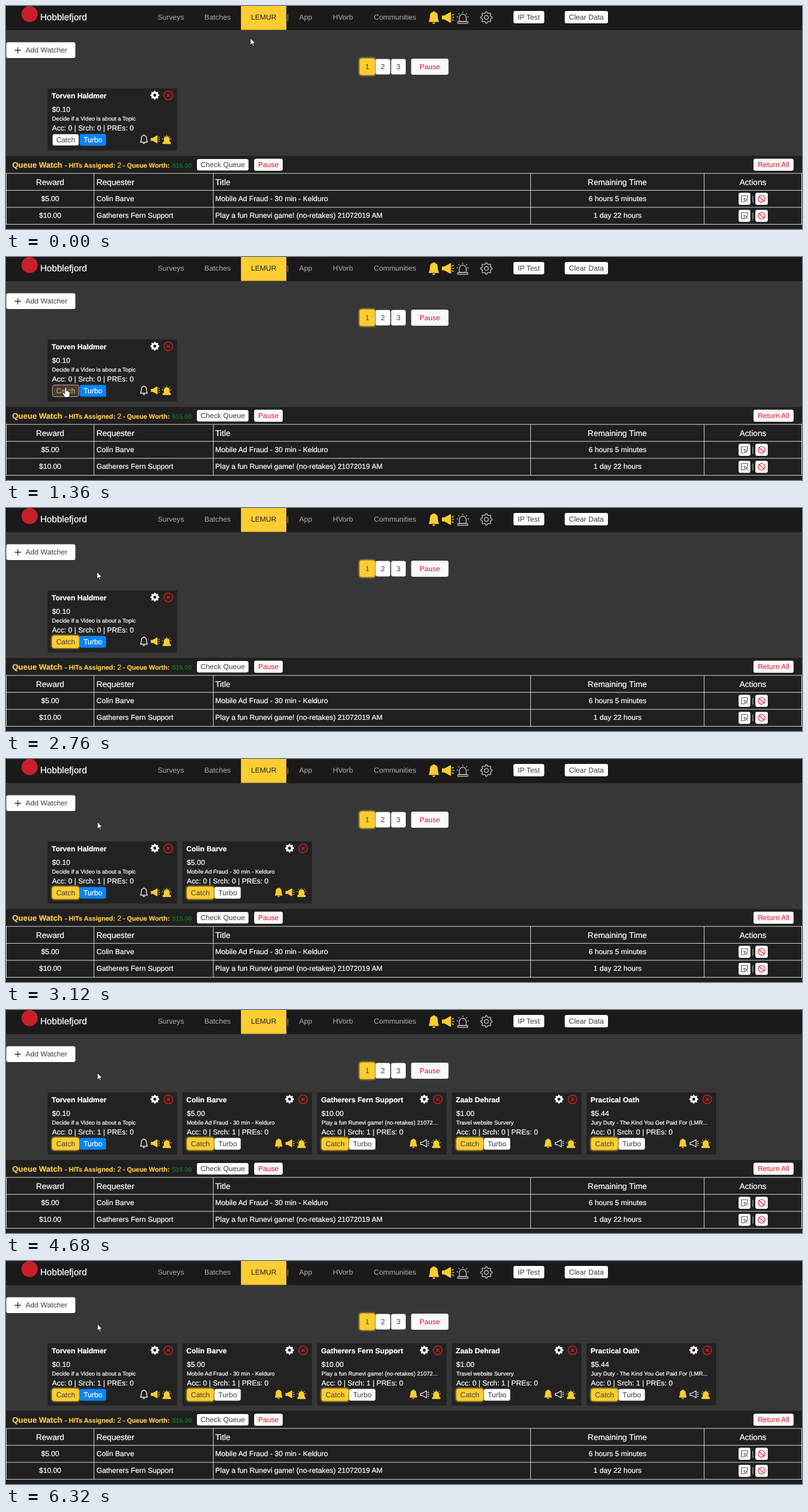
Animation of 1280x360 px, one loop 6360 ms. Source, as an HTML page:

```html
<!DOCTYPE html>
<html lang="en">
<head>
<meta charset="utf-8">
<title>Watcher dashboard</title>
<style>
  html, body { margin: 0; width: 100%; height: 100%; overflow: hidden; background: #373737; }
  svg { display: block; width: 1280px; height: 360px; }
  text { font-family: "Liberation Sans", Arial, sans-serif; font-size: 11.7px; white-space: pre; text-rendering: geometricPrecision; }
</style>
</head>
<body>
<svg id="stage" viewBox="0 0 1280 360" xmlns="http://www.w3.org/2000/svg"></svg>
<script>
const LOOP = 6360;
const YELLOW = "#fecd32", GOLD = "#fdc849", WHITE = "#fff", DARK = "#222", INK = "#3c3f43", RED = "#e01b24", GREY = "#adadad";

// Drawing helpers; light text on dark gets a hairline stroke to look as full as on screen
const rect = (x, y, w, h, fill, extra = "") =>
  `<rect x="${x}" y="${y}" width="${w}" height="${h}" fill="${fill}" ${extra}/>`;
const text = (x, y, s, fill = WHITE, { size = 11.7, anchor = "start", bold = false, id = "" } = {}) =>
  `<text x="${x}" y="${y}" fill="${fill}" text-anchor="${anchor}" style="font-size:${size}px"` +
  `${[WHITE, GOLD].includes(fill) ? ` stroke="${fill}" stroke-width=".22"` : ""}` +
  `${bold ? ' font-weight="700"' : ""}${id ? ` id="${id}"` : ""}>${s}</text>`;
const mid = (x, y, s, fill, opts) => text(x, y, s, fill, { ...opts, anchor: "middle" });
const button = (x, y, w, h, label, { bg = WHITE, fg = INK, glow = false, id = "" } = {}) =>
  `<g ${id ? `id="${id}"` : ""}>` +
  (glow ? rect(x - 1, y - 1, w + 2, h + 2, YELLOW, 'class="glow" rx="4" filter="url(#glow)"') : "") +
  rect(x, y, w, h, bg, 'class="face" rx="3"') +
  mid(x + w / 2, y + h / 2 + 4.1, label, fg) + "</g>";
const at = (x, y, scale, body) => `<g transform="translate(${x} ${y}) scale(${scale})">${body}</g>`;
const path = (d, attrs) => `<path d="${d}" ${attrs}/>`;
const paint = (color, solid) =>
  `fill="${solid ? color : "none"}" stroke="${color}" stroke-width="1.2" stroke-linejoin="round"`;

// Icons, centred on the origin
const bell = (color, solid) =>
  path("M-5.5 4.8C-4.2 3-4.2-.5-4-2.5A4 4 0 0 1-.9-6 .9 .9 0 1 1 .9-6 4 4 0 0 1 4-2.5C4.2-.5 4.2 3 5.5 4.8Z", paint(color, solid)) +
  path("M-1.8 6.2a1.8 1.6 0 0 0 3.6 0Z", `fill="${color}"`);
const horn = (color, solid) =>
  path("M-7-2H-4L3.5-6.2V6.2L-4 2H-7Z", paint(color, solid)) +
  path("M5.5-3 7.5-4M5.8 0H8M5.5 3 7.5 4", `fill="none" stroke="${color}" stroke-width="1.3"`);
const siren = (color, solid) =>
  path("M-4.4 4.6V-.4a4.4 4.4 0 0 1 8.8 0V4.6Z", paint(color, solid)) +
  path("M-6.4 4.8H6.4V7H-6.4Z", paint(color, solid)) +
  path("M0-8V-6.4M-5.4-6-4.4-4.9M5.4-6 4.4-4.9M-7.8-1.5H-6.1M7.8-1.5H6.1", `fill="none" stroke="${color}" stroke-width="1.2"`);
const gearPath = (outer, inner) => {
  const points = [];
  for (let i = 0; i < 32; i++) {
    const r = i % 4 < 2 ? outer : inner, a = (i - 0.5) * Math.PI / 16;
    points.push(`${(r * Math.cos(a)).toFixed(2)} ${(r * Math.sin(a)).toFixed(2)}`);
  }
  return `M${points.join("L")}Z`;
};
const smallGear = path(gearPath(7.2, 5.6) + "M2.4 0A2.4 2.4 0 1 0-2.4 0 2.4 2.4 0 1 0 2.4 0Z", 'fill="#fff" fill-rule="evenodd"');
const bigGear = path(gearPath(9.2, 7.2), `fill="none" stroke="${GREY}" stroke-width="1.5" stroke-linejoin="round"`) +
  `<circle r="3.2" fill="none" stroke="${GREY}" stroke-width="1.5"/>`;
const closeIcon = path("M7 0A7 7 0 1 0-7 0 7 7 0 1 0 7 0ZM-2.6-2.6 2.6 2.6M2.6-2.6-2.6 2.6", 'fill="none" stroke="#c61f1f" stroke-width="1.6"');
const openIcon = path("M5 0V-5H-5V5H0M-1-1 5 1.4 2.6 2.4 5.4 5.2M-1-1 1 5 2.2 2.6", 'fill="none" stroke="#444" stroke-width=".9"');
const banIcon = path("M5.4 0A5.4 5.4 0 1 0-5.4 0 5.4 5.4 0 1 0 5.4 0ZM-3.8-3.8 3.8 3.8", `fill="none" stroke="${RED}" stroke-width="1.1"`);

const cards = [
  { name: "Torven Haldmer", pay: "$0.10", task: "Decide if a Video is about a Topic", shown: 0, turbo: true, bell: false, horn: true },
  { name: "Colin Barve", pay: "$5.00", task: "Mobile Ad Fraud - 30 min - Kelduro", shown: 2840, bell: true, horn: true },
  { name: "Gatherers Fern Support", pay: "$10.00", task: "Play a fun Runevi game! (no-retakes) 21072...", shown: 3320, bell: true },
  { name: "Zaab Dehrad", pay: "$1.00", task: "Travel website Survery", shown: 3720, bell: true },
  { name: "Practical Oath", pay: "$5.44", task: "Jury Duty - The Kind You Get Paid For (LMR...", shown: 4680, bell: true }
];
const searchTime = i => 2800 + 840 * i;

function drawNav() {
  const links = [["Surveys", 244], ["Batches", 319], ["|", 451.5], ["App", 471.5], ["HVorb", 525.5], ["Communities", 591.5]];
  return rect(0, 0, 1280, 39, "#1a1a1a") +
    '<circle cx="38" cy="13" r="13" fill="#c8202a"/>' +
    text(55, 22.5, "Hobblefjord", WHITE, { size: 14.7 }) +
    links.map(([s, x]) => text(x, 22, s, GREY)).join("") +
    rect(377.8, 0, 73, 38.6, YELLOW) + mid(414.5, 22, "LEMUR", DARK) +
    at(688, 18.5, 1.35, bell(YELLOW, true)) + at(710.5, 18.5, 1.25, horn(YELLOW, true)) +
    at(734.5, 19.3, 1.25, siren(GREY, false)) + at(772.5, 18.5, 1, bigGear) +
    button(816, 8, 49.5, 20, "IP Test") + button(898.5, 8, 69.5, 20, "Clear Data");
}

function drawToolbar() {
  return rect(0.5, 58.5, 111, 25.5, WHITE, 'rx="3"') +
    path("M14 71.5H24M19 66.5V76.5", 'stroke="#333" stroke-width="1.3"') + text(31.5, 75.2, "Add Watcher", INK) +
    button(569, 85, 24, 26, "1", { bg: YELLOW, fg: INK, glow: true }) +
    button(594.3, 85.5, 23.5, 25, "2") + button(619.3, 85.5, 23.5, 25, "3") +
    button(651.5, 85, 60, 26, "Pause", { bg: "#f8f9fa", fg: RED });
}

function drawCard(card, i) {
  const first = i === 0;
  return `<g id="card${i}" transform="translate(${67 + 216.65 * i} 0)">` +
    rect(0, 133, 208.3, 100.3, DARK) +
    text(6.4, 149, card.name, WHITE, { bold: true }) +
    at(172.3, 144, 1, smallGear) + at(194, 144.2, 1, closeIcon) +
    text(7, 170.5, card.pay) + text(7, 184.6, card.task, WHITE, { size: 9.15 }) +
    text(7, 201, "Acc: 0 | Srch: 0 | PREs: 0", WHITE, { id: "stats" + i }) +
    button(7.6, 206.6, 42.6, 18.9, "Catch", { bg: YELLOW, fg: INK, glow: true, id: first ? "catch" : "" }) +
    button(51.6, 206.6, 42.2, 18.9, "Turbo", card.turbo ? { bg: "#0a84fa", fg: WHITE } : {}) +
    at(154.8, 215, 1, bell(card.bell ? YELLOW : WHITE, card.bell)) +
    at(172.8, 215.3, 0.92, horn(card.horn ? YELLOW : WHITE, card.horn)) +
    at(191.5, 215.5, 0.95, siren(YELLOW, true)) + "</g>";
}

function drawQueue() {
  const header = { size: 13.2 }, small = { size: 10.45, bold: true };
  const top = 270.2, rowHeight = 27.4;
  const rows = [
    ["$5.00", "Colin Barve", "Mobile Ad Fraud - 30 min - Kelduro", "6 hours 5 minutes"],
    ["$10.00", "Gatherers Fern Support", "Play a fun Runevi game! (no-retakes) 21072019 AM", "1 day 22 hours"]
  ];
  return rect(0, 242, 1280, 118, "#1f1f1f") +
    text(10, 261, "Queue Watch", GOLD, { size: 12.7, bold: true }) +
    text(94.5, 260.5, "- HITs Assigned:", GOLD, small) + text(179, 260.5, "2", GOLD) +
    text(188, 260.5, "- Queue Worth:", GOLD, small) + text(267, 260.5, "$15.00", "#126b25", small) +
    button(307, 247, 83, 18.5, "Check Queue") +
    button(399, 246.5, 46, 19.5, "Pause", { bg: "#f8f9fa", fg: RED }) +
    button(1202, 246.5, 64.5, 19.5, "Return All", { bg: "#f8f9fa", fg: RED }) +
    path([0, 1, 2, 3].map(i => `M0 ${top + rowHeight * i}H1280`).join("") +
      [0.5, 141.5, 333.3, 843.5, 1122.7, 1279.5].map(x => `M${x} ${top}V${top + 3 * rowHeight}`).join(""),
      'stroke="#fff" stroke-width=".8"') +
    mid(71, 288.5, "Reward", WHITE, header) + text(145.5, 288.5, "Requester", WHITE, header) +
    text(336.5, 288.5, "Title", WHITE, header) + mid(983, 288.5, "Remaining Time", WHITE, header) +
    mid(1201, 288.5, "Actions", WHITE, header) +
    rows.map(([pay, who, title, left], i) => {
      const y = 315 + rowHeight * i;
      return mid(71, y, pay) + text(145.5, y, who) + text(336.5, y, title) + mid(983.5, y, left) +
        rect(1178, y - 13.5, 19, 19.5, WHITE, 'rx="3"') + at(1187.5, y - 3.8, 1, openIcon) +
        mid(1201, y, "|", "#ccc") +
        rect(1205, y - 13.5, 20, 19.5, WHITE, 'rx="3"') + at(1215, y - 3.8, 1, banIcon);
    }).join("");
}

const pointerPaint = 'fill="#fff" stroke="#111" stroke-width=".8" stroke-linejoin="round"';
const cursor =
  `<g id="arrow">${path("M0 0V11.2L2.6 8.8 4.4 12.7 6 12 4.3 8.2H7.8Z", pointerPaint)}</g>` +
  `<g id="hand">${path("M-1.4 1Q0-.8 1.3 1V6Q2.6 5 3.6 6.3 4.6 5.8 5 6.9 6.6 6 6.7 8V11.5Q6.6 13.6 5 16H-1.6Q-3 13-4.7 10.2-5.2 8-3.2 8.5L-1.4 10Z", pointerPaint)}</g>`;

const $ = id => document.getElementById(id);
$("stage").innerHTML =
  '<defs><filter id="glow" x="-30%" y="-50%" width="160%" height="200%"><feGaussianBlur stdDeviation="1.6"/></filter></defs>' +
  rect(0, 0, 1280, 360, "#373737") + drawNav() + drawToolbar() + cards.map(drawCard).join("") + drawQueue() + cursor;

const catchFace = document.querySelector("#catch .face");
const catchGlow = document.querySelector("#catch .glow");
const catchLabel = document.querySelector("#catch text");
catchFace.setAttribute("stroke-width", 0.8);

// Keyframes: [time, value]
const pointerKeys = [[160, [393, 52]], [1240, [96, 210.5]], [1720, [96, 210.5]], [2040, [96, 213]], [2280, [96, 213]], [2800, [147, 101.5]]];
const faceKeys = [[1220, [255, 255, 255]], [1360, [72, 60, 57]], [2000, [72, 60, 57]], [2080, [146, 119, 96]], [2360, [146, 119, 96]], [2520, [254, 205, 50]]];
const labelKeys = [[1220, [60, 63, 67]], [1360, [232, 180, 84]], [2000, [232, 180, 84]], [2080, [108, 85, 58]], [2360, [108, 85, 58]], [2520, [60, 63, 67]]];
const edgeKeys = [[1220, [34, 34, 34]], [1360, [214, 186, 155]], [2000, [214, 186, 155]], [2080, [254, 200, 60]], [2520, [254, 205, 50]]];
const glowKeys = [[2000, [0]], [2080, [0.35]], [2360, [0.35]], [2520, [1]]];

const smooth = u => u * u * (3 - 2 * u);
function track(keys, t, ease = u => u) {
  if (t <= keys[0][0]) return keys[0][1];
  for (let i = 1; i < keys.length; i++) {
    const [t0, a] = keys[i - 1], [t1, b] = keys[i];
    if (t < t1) return a.map((v, k) => v + (b[k] - v) * ease((t - t0) / (t1 - t0)));
  }
  return keys[keys.length - 1][1];
}
const rgb = c => `rgb(${c.map(Math.round).join(",")})`;

function render(t) {
  cards.forEach((card, i) => {
    $("card" + i).style.display = t >= card.shown ? "" : "none";
    $("stats" + i).textContent = `Acc: 0 | Srch: ${t >= searchTime(i) ? 1 : 0} | PREs: 0`;
  });

  const [x, y] = track(pointerKeys, t, smooth);
  const overButton = x > 74 && x < 161 && y > 205 && y < 226;
  for (const [id, visible] of [["arrow", !overButton], ["hand", overButton]]) {
    $(id).setAttribute("transform", `translate(${x.toFixed(2)} ${y.toFixed(2)})`);
    $(id).style.display = visible ? "" : "none";
  }

  catchFace.setAttribute("fill", rgb(track(faceKeys, t)));
  catchFace.setAttribute("stroke", rgb(track(edgeKeys, t)));
  catchLabel.setAttribute("fill", rgb(track(labelKeys, t)));
  catchGlow.setAttribute("opacity", track(glowKeys, t)[0]);
}

const start = performance.now();
function tick() {
  render((performance.now() - start) % LOOP);
  requestAnimationFrame(tick);
}
render(0);
requestAnimationFrame(tick);
</script>
</body>
</html>
```
